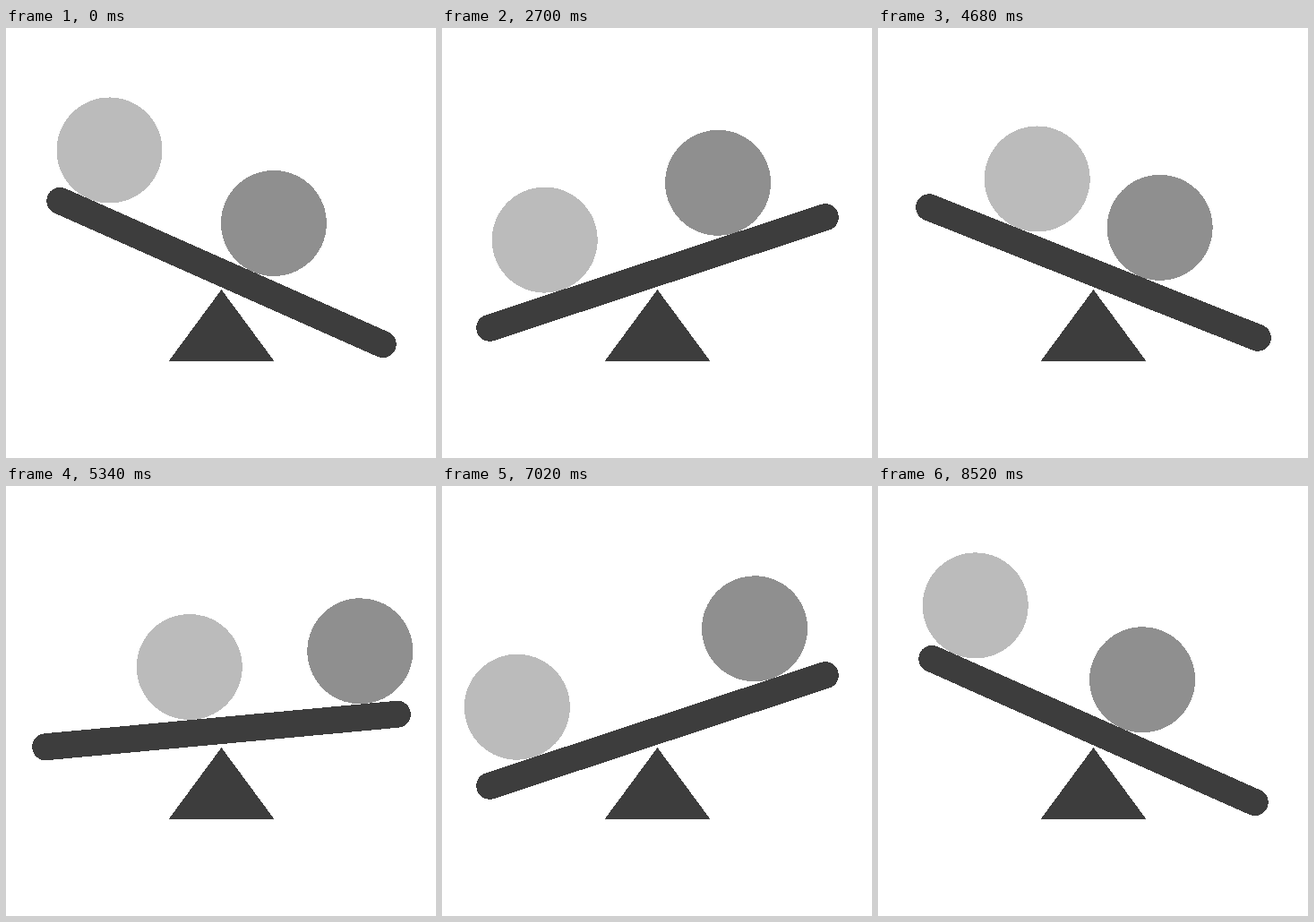
Recreate the animation shown at these times as an HTML page. Size 480 by 480 pixels, loop 8.58 s.

```html
<!DOCTYPE html>
<html lang="en">
<head>
<meta charset="utf-8">
<title>Seesaw</title>
<style>
  html, body { margin: 0; width: 100%; height: 100%; overflow: hidden; background: #fff; }
  svg { display: block; width: 100%; height: 100%; }
</style>
</head>
<body>
<svg viewBox="0 0 480 480" shape-rendering="crispEdges">
  <path d="M240.5 292L299.5 372H181.5Z" fill="#3d3d3d"/>
  <g id="seesaw">
    <circle id="light" cy="-74" r="59" fill="#bbb"/>
    <circle id="dark" cy="-74" r="59" fill="#8f8f8f"/>
    <path d="M-197.2 0H197.2" stroke="#3d3d3d" stroke-width="30" stroke-linecap="round"/>
  </g>
</svg>
<script>
const STEP = 60, STEPS = 143, CYCLE = 144;
const SWING = CYCLE / 4, ROLL = 33;
const $ = id => document.getElementById(id);
const seesaw = $('seesaw'), light = $('light'), dark = $('dark');

// Steps at which each ball sets off, alternately right and left.
const lightStarts = [-7.4, 30.6, 63.3, 99.8];
const darkStarts = [-5.1, 30.2, 68.7, 105.5];

// cubic-bezier(.59, 0, .3, 1), solved by bisection
function ease(x) {
  let lo = 0, hi = 1;
  for (let i = 0; i < 24; i++) {
    const t = (lo + hi) / 2, u = 1 - t;
    if (3 * t * u * u * 0.59 + 3 * t * t * u * 0.3 + t * t * t < x) lo = t;
    else hi = t;
  }
  return lo * lo * (3 - 2 * lo);
}

// Move from a to b on even turns, back on odd ones.
function between(a, b, turn, progress) {
  const p = ease(Math.min(progress, 1));
  return a + (b - a) * (turn % 2 ? 1 - p : p);
}

function roll(starts, left, right, k) {
  if (k >= starts[0] + CYCLE) k -= CYCLE;
  const turn = starts.filter(s => s <= k).length - 1;
  return between(left, right, turn, (k - starts[turn]) / ROLL);
}

function draw(now) {
  const k = Math.floor(now / STEP) % STEPS + 1;
  const tilt = between(24, -24, Math.floor(k / SWING), k % SWING / SWING);
  seesaw.setAttribute('transform', `translate(240.5 273) rotate(${tilt})`);
  light.setAttribute('cx', roll(lightStarts, -185, -24, k));
  dark.setAttribute('cx', roll(darkStarts, 24, 185, k));
}

const start = performance.now();
function loop() {
  draw(performance.now() - start);
  requestAnimationFrame(loop);
}
loop();
</script>
</body>
</html>
```
